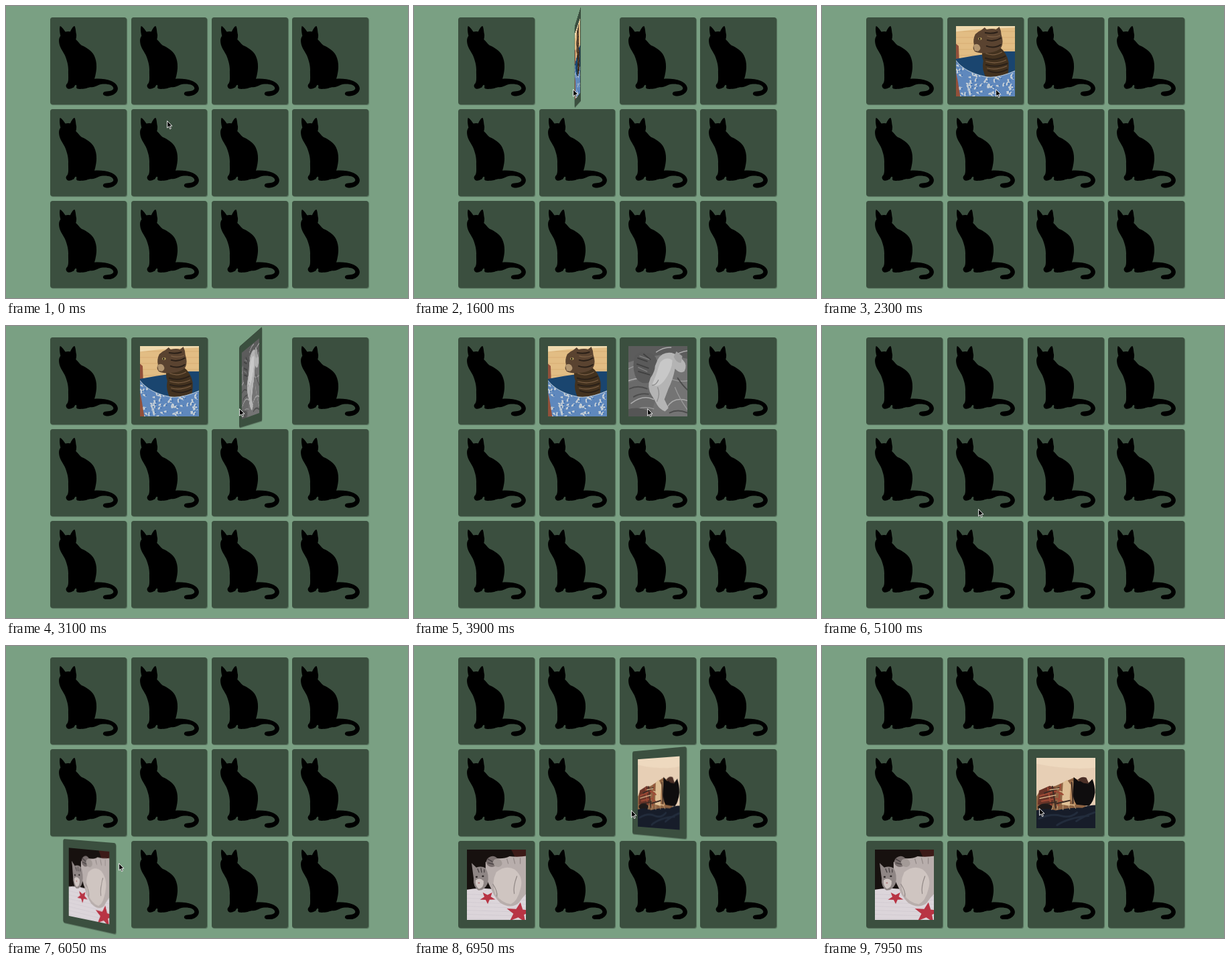
An HTML page that plays this animation: 600x436 px, repeating every 8000 ms.

```html
<!DOCTYPE html>
<html lang="en">
<head>
<meta charset="utf-8">
<title>Memory cards</title>
<style>
  html, body { margin: 0; width: 100%; height: 100%; overflow: hidden; background: #7aa083; }
  #board {
    position: absolute; left: 0; top: 0; width: 600px; height: 436px;
    overflow: hidden; perspective: 755px; perspective-origin: 303.7px 218px;
  }
  .card { position: absolute; width: 113.8px; height: 130.1px; transform-style: preserve-3d; }
  .face {
    position: absolute; inset: 0; border-radius: 3.5px; background: #3b4f3f;
    box-shadow: 1px 1px 1px rgba(0, 0, 0, .3); backface-visibility: hidden;
  }
  .back { transform: rotateY(180deg); }
  .face svg { position: absolute; left: 13px; top: 13px; width: 88px; height: 104.5px; overflow: hidden; }
  .back g { filter: blur(.7px); }
  #cursor { position: absolute; left: 0; top: 0; width: 12px; height: 16px; overflow: visible; }
</style>
</head>
<body>
<div id="board"></div>
<svg id="cursor" viewBox="0 0 12 16">
  <path d="M.6 .6V11L3 8.8 4.6 12.6 6.3 11.9 4.7 8.1H8Z" fill="#000" stroke="#fff" stroke-width=".9"/>
</svg>
<script>
const LOOP = 8000, STEP = 50, FLIP = 500;
const board = document.getElementById('board');
const cursor = document.getElementById('cursor');

let seed = 7;
const rnd = () => (seed = seed * 16807 % 2147483647) / 2147483647;
const shape = (d, fill, extra = '') => `<path d="${d}" fill="${fill}" ${extra}/>`;
const line = (d, color, width) => shape(d, 'none', `stroke="${color}" stroke-width="${width}" stroke-linecap="round"`);
const oval = (x, y, rx, ry, fill, turn = 0) =>
  `<ellipse cx="${x}" cy="${y}" rx="${rx}" ry="${ry}" fill="${fill}" transform="rotate(${turn} ${x} ${y})"/>`;
const ground = fill => shape('M-5 -5H94V110H-5Z', fill);
const repeat = (n, draw) => Array.from({ length: n }, (_, i) => draw(i)).join('');
const star = (x, y, r, turn) => shape('M' + Array.from({ length: 10 }, (_, i) => {
  const a = turn + i * Math.PI / 5, k = i % 2 ? r * .42 : r;
  return `${(x + k * Math.cos(a)).toFixed(1)} ${(y + k * Math.sin(a) * .8).toFixed(1)}`;
}).join('L') + 'Z', '#b83444');

const silhouette = shape(
  'M1.6 0C3.2 0 7.5 5 9.6 8.6Q13 7.6 17 8.4C18.6 5 21 0 23.6 0C25.3 3 25.2 9 26.2 12.5' +
  'Q26.4 17 25.4 20.2C29 23 30.5 26.5 34 29C40 31.5 49 36.5 53 44.5C56.5 52 57 60 55.8 68' +
  'Q54.8 74.5 53.3 79.2C61 78.4 71 79.5 78 82.2C84.5 84.7 88.6 89.6 88.4 94' +
  'C88.2 99.5 82 104.6 74 104.9C66.5 105.2 64.2 101.2 68 98.8C72 97 80.5 98.8 81.8 93.8' +
  'C82 88.2 73 86.4 66 87C59.5 87.2 55 92 49 91.8C43 91.6 41 94.6 35 94.2' +
  'C30 94.6 25.8 94.4 26.2 91.5Q27 89 25.6 88.2C23 88.5 23.6 92.4 20.4 92.8' +
  'C18 94.5 13.5 94.8 11.8 92.6C9.6 90 10.8 87.6 12.6 86C14.8 82 14 76 14 68' +
  'C14.6 59 11.6 50 8.8 43.5C5.6 37 1.2 32 .4 25.5' +
  'C-.3 21 0 18 2.4 14.5C1.2 10 .4 4 1.6 0Z', '#000');

const tabbyInBox = () => ground('#e2bd84') +
  repeat(5, i => line(`M0 ${8 + i * 9}H89`, '#d3aa70', .8)) +
  shape('M-5 -5H94V2L30 5 -5 9Z', '#efd9ae') +
  shape('M-5 22L4 30 7 110H-5Z', '#93503a') +
  shape('M-5 50L24 45 72 38 94 38V80L44 84 -5 60Z', '#1a456f') +
  shape('M40 34L66 32Q76 40 79 54Q80 68 76 78L46 79Q38 66 41 52Q38 44 40 34Z', '#43321f') +
  shape('M38 6L43 2 46 5Q55 3 60 5L65 1Q68 7 68 13Q72 24 68 32Q62 39 50 40Q36 42 28 38' +
    'Q24 33 27 28Q25 20 29 12Q33 8 38 6Z', '#5a4330') +
  shape('M26 29Q31 25 35 29Q39 35 33 38L28 37Z', '#b39670') +
  oval(36, 19, 2.8, 1.8, '#c2aa66') + oval(35.6, 19, 1.1, 1.6, '#15110d') +
  line('M44 10Q54 12 62 9M47 21Q57 24 67 18M46 30Q58 34 67 28M44 48Q58 53 74 45M45 58Q60 63 77 56M48 67Q62 73 77 65', '#2a2018', 2) +
  line('M47 15Q57 18 66 14M45 41Q57 46 69 39M45 53Q60 58 75 51M47 63Q60 67 76 60', '#7d6045', 1.2) +
  '<clipPath id="tub"><path d="M-5 48C10 66 26 72 44 76Q62 79 94 65V110H7Q3 78 -5 48Z"/></clipPath>' +
  '<g clip-path="url(#tub)">' + ground('#5f88bd') +
  repeat(90, () => {
    const x = rnd() * 89, y = 52 + rnd() * 54, turn = rnd() * 180;
    return oval(x, y, 3.2, 1.4, '#c6cfd6', turn) + oval(x + 2, y, 1.4, 1.2, '#4474b2', turn + 80);
  }) + '</g>' + line('M0 52C10 65 26 72 44 76Q62 79 89 67', '#b4c6d6', 1.2);

const greyNap = () => ground('#747474') +
  shape('M-5 -5H94V20L55 12 20 18 -5 26Z', '#5c5c5c') +
  shape('M-5 57L32 43 42 75 32 110H-5Z', '#6a6a6a') +
  line('M0 52Q20 45 31 51T48 72M4 86Q22 72 38 80M58 92Q68 75 89 82M64 17Q78 8 89 7M42 9Q53 1 64 2', '#adadad', 1.5) +
  line('M0 34Q17 28 24 15M6 100Q18 88 38 94M70 62Q76 78 89 96M66 50Q78 54 89 52', '#9a9a9a', 1.3) +
  line('M2 64Q14 58 28 64M8 76Q18 70 30 72M62 100Q74 94 88 100M74 48Q82 60 89 66', '#4c4c4c', 2) +
  shape('M10 15Q17 5 27 11Q39 8 43 22Q48 35 39 47L30 55Q15 58 10 44Q5 29 10 15Z', '#5a5a5a') +
  line('M14 18L28 23M13 27L30 33M15 38L32 43M23 12L33 20', '#404040', 1.8) +
  line('M17 15L31 20M15 32L28 38', '#808080', 1.4) +
  shape('M44 20Q51 8 65 10Q75 13 82 21Q89 28 84 38Q77 42 70 34Q67 50 60 64L54 80' +
    'Q58 88 60 93L55 98Q47 95 43 88Q38 78 35 74Q27 62 33 48Q40 38 40 30Z', '#b4b4b4') +
  shape('M48 24Q57 15 66 21Q66 36 53 53Q43 64 36 57Q43 41 45 32Z', '#c8c8c8') +
  shape('M68 16L72 8 81 15 79 25Q72 25 68 16Z', '#a0a0a0') +
  line('M44 62Q48 72 43 83M36 59Q42 58 45 51', '#8c8c8c', 1.3) +
  shape('M-5 96Q15 89 31 98L25 110H-5Z', '#555');

const kittenOnStars = () => ground('#17110f') +
  shape('M64 -5H94V14L72 11Z', '#3c1b18') +
  shape('M-5 61Q22 55 48 61L94 65V110H-5Z', '#dcd5da') +
  repeat(7, i => line(`M0 ${67 + i * 6}L89 ${70 + i * 6}`, '#cfc7ce', .7)) +
  star(31, 72, 12, .3) + star(78, 95, 20, -.2) +
  shape('M28 19Q34 12 45 13Q56 14 64 10Q77 12 94 9V62Q84 70 78 80Q66 90 50 80Q40 70 36 58L28 42Z', '#b8aeac') +
  shape('M44 34Q58 22 72 30Q86 42 80 60Q76 77 66 82Q52 80 43 67Q36 50 44 34Z', '#cfc5c1') +
  oval(38, 18, 9, 8, '#786e6d', -15) + oval(46, 20, 7, 6, '#a39a97', 25) +
  shape('M7 20L14 27Q22 24 28 28Q34 38 31 51Q26 62 17 61Q9 56 10 43Z', '#8f8685') +
  shape('M13 46Q19 41 25 47Q26 57 18 59Q12 55 13 46Z', '#cfc5c2') +
  oval(14.5, 41, 1.6, 1.2, '#2c2626') + oval(24, 40, 1.6, 1.2, '#2c2626') + oval(18, 50, 1.5, 1, '#ad7779') +
  line('M16 29L18 34M21 28L22 34M26 30L26 34M31 14L38 18M32 20L40 22', '#464041', 1.3) +
  line('M60 14L62 21M70 13L72 21M80 13L80 21M39 52Q46 62 45 70M75 40Q69 56 71 66', '#938a88', 1.3);

const catInBlanket = () => ground('#e7cfb5') +
  shape('M-5 -5H94V14Q53 20 -5 8Z', '#eed9bf') +
  shape('M-5 66L5 50 15 45 29 42 45 35 56 30 74 38V82H-5Z', '#8f6443') +
  shape('M4 49L20 42 31 46 23 74 2 70Z', '#6a3428') +
  shape('M40 37L46 33 52 41 50 72 38 70Z', '#dfc096') +
  shape('M52 36L60 34 66 62 57 72 50 60Z', '#b98a5f') +
  line('M5 57L29 50 40 55M8 65L31 61 40 66M17 45L22 72M36 40L33 72', '#a04a35', 2) +
  line('M24 43L29 75M53 37L55 68M12 53L34 45M28 69L50 64M8 70L30 66', '#3c2b24', 2) +
  line('M5 61L29 56M35 50L45 53M39 69L57 71M20 48L34 46', '#e2c396', 1.3) +
  shape('M55 50L56 29 63 35 72 34 78 38 84 32Q88 42 88 52Q86 66 79 72L60 70Q54 61 55 50Z', '#0f0d0e') +
  shape('M62 33Q68 27 75 30L79 39 71 38Z', '#4c3027') +
  oval(13, 74, 11, 5, '#1f1a19') +
  shape('M-5 80Q14 74 29 79Q52 74 69 75Q80 70 94 71V110H-5Z', '#171d2a') +
  line('M4 91Q23 83 37 87T61 82M31 101Q48 90 78 87M60 95Q72 87 87 82', '#222c3c', 3) +
  line('M25 72L23 78M32 72L31 78M40 71L40 78M48 71L50 77M56 71L59 76', '#c9ab82', .9);

// slot, photo, time turned up, time turned down
const turns = [
  [1, tabbyInBox, 1440, 4435],
  [2, greyNap, 2935, 4435],
  [8, kittenOnStars, 5797, Infinity],
  [6, catInBlanket, 6735, Infinity]
];

const svg = body => `<svg viewBox="0 0 88.5 105" preserveAspectRatio="none"><g>${body}</g></svg>`;
const cards = Array.from({ length: 12 }, (_, i) => {
  const card = document.createElement('div');
  const turn = turns.find(t => t[0] === i);
  card.className = 'card';
  card.style.left = 66.3 + i % 4 * 120.3 + 'px';
  card.style.top = 17.2 + Math.floor(i / 4) * 136.8 + 'px';
  card.innerHTML = `<div class="face">${svg(silhouette)}</div>` +
    (turn ? `<div class="face back">${svg(turn[1]())}</div>` : '');
  board.append(card);
  return card;
});

// time, x, y of the pointer tip
const route = [
  [0, 240, 171], [100, 236, 165], [700, 236, 165], [1100, 237, 124],
  [2000, 237, 124], [2300, 259, 124], [2700, 348, 123], [4450, 348, 123],
  [4900, 243, 258], [5050, 243, 258], [5100, 233, 273], [5600, 168, 324],
  [6100, 168, 324], [6650, 324, 245], [7000, 324, 245], [7300, 324, 242], [LOOP, 324, 242]
];

const clamp = v => Math.min(1, Math.max(0, v));
const smooth = u => u * u * (3 - 2 * u);
const bezier = (u, a, b) => 3 * u * (1 - u) * (1 - u) * a + 3 * u * u * (1 - u) * b + u * u * u;

// cubic-bezier(.25, .1, .25, 1)
function ease(x) {
  if (x <= 0 || x >= 1) return clamp(x);
  let lo = 0, hi = 1;
  for (let i = 0; i < 24; i++) {
    const mid = (lo + hi) / 2;
    if (bezier(mid, .25, .25) < x) lo = mid; else hi = mid;
  }
  return bezier(lo, .1, 1);
}

function pointer(t) {
  const i = route.findIndex(p => p[0] > t);
  const [t0, x0, y0] = route[i - 1], [t1, x1, y1] = route[i];
  const u = smooth((t - t0) / (t1 - t0));
  return [x0 + (x1 - x0) * u, y0 + (y1 - y0) * u];
}

function render(t) {
  for (const [slot, , up, down] of turns) {
    const angle = 180 * (ease((t - up) / FLIP) - ease((t - down) / FLIP));
    cards[slot].style.transform = `rotateY(${angle.toFixed(3)}deg)`;
  }
  const [x, y] = pointer(t);
  cursor.style.transform = `translate(${x.toFixed(2)}px, ${y.toFixed(2)}px)`;
}

const start = performance.now();
function tick() {
  const t = (performance.now() - start) % LOOP;
  render(Math.floor(t / STEP) * STEP);
  requestAnimationFrame(tick);
}
render(0);
requestAnimationFrame(tick);
</script>
</body>
</html>
```
